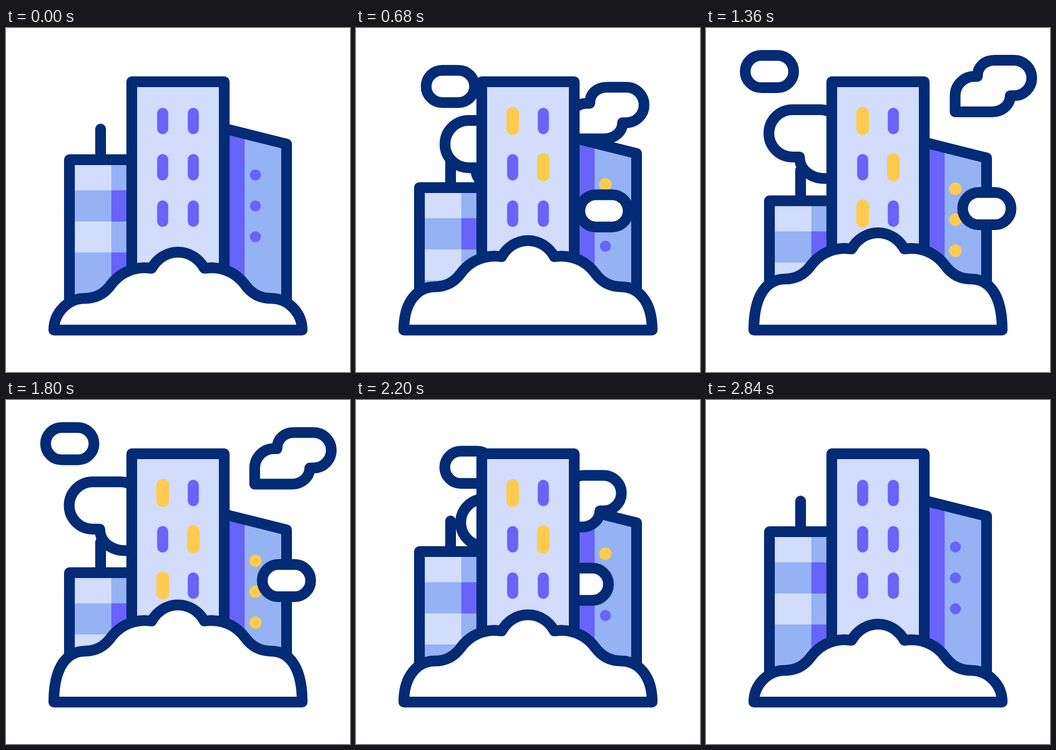
Recreate the animation shown at these times as an HTML page. Size 640 by 640 pixels, loop 3000 ms.

```html
<!DOCTYPE html>
<html lang="en">
<head>
<meta charset="utf-8">
<title>City in the clouds</title>
<style>
  html, body { margin: 0; width: 100%; height: 100%; overflow: hidden; background: #fff; }
  svg { display: block; width: 100%; height: 100%; }
  .line { stroke: #042b76; stroke-width: 20; stroke-linecap: round; stroke-linejoin: round; }
  .white { fill: #fff; }
  .light { fill: #d2dcfd; }
  .mid { fill: #94b2f4; }
  .violet { fill: #6863f9; }
  .none { fill: none; }
</style>
</head>
<body>
<svg viewBox="0 0 640 640">
  <defs>
    <clipPath id="ground"><rect width="640" height="530"/></clipPath>
  </defs>

  <g clip-path="url(#ground)">
    <g id="left">
      <rect class="light" x="118" y="245" width="116" height="300"/>
      <rect class="mid" x="196" y="245" width="38" height="300"/>
      <rect class="mid" x="118" y="302" width="78" height="58"/>
      <rect class="violet" x="196" y="302" width="38" height="58"/>
      <rect class="mid" x="118" y="417.500" width="78" height="130"/>
      <rect class="violet" x="196" y="417.500" width="38" height="130"/>
      <path class="line none" d="M118 560V245H234M176 188V245"/>
    </g>
    <g id="right">
      <path class="mid" d="M406 187L522 216V560H406Z"/>
      <path class="violet" d="M406 187L444 196.500V560H406Z"/>
      <path class="line none" d="M406 187L522 216V560"/>
      <g id="dots"></g>
    </g>
  </g>

  <g class="line white">
    <rect id="pillA" x="73" y="51" width="90" height="60" rx="30"/>
    <path id="puffA" d="M161 152H212C236 152 254 172 254 196V280H222C195 280 174 264 174 240H161A44 44 0 0 1 161 152Z"/>
    <path id="puffB" d="M463.500 156V126A36 36 0 0 1 499.500 90H505C505 72 518 60 537 60H573A33 33 0 0 1 573 126H566C566 143 551 156 532 156Z"/>
    <rect id="pillB" x="477.500" y="306" width="90" height="60" rx="30"/>
  </g>

  <rect class="line light" x="234" y="100" width="172" height="410"/>
  <g id="windows" stroke-linecap="round"></g>
  <path id="mound" class="line white"/>
</svg>

<script>
const LOOP = 3000, STEP = 40, BACK = 1600;
const VIOLET = '#6863f9', YELLOW = '#ffcb4f';
const $ = id => document.getElementById(id);

function add(parent, tag, attrs) {
  const el = document.createElementNS('http://www.w3.org/2000/svg', tag);
  for (const k in attrs) el.setAttribute(k, attrs[k]);
  return $(parent).appendChild(el);
}

// Ease knots: time in ms, value, slope per ms
const KNOTS = [
  [120, 0, 0], [400, .097, .00095], [480, .25, .0021],
  [600, .515, .0022], [880, .928, .0005], [1240, 1, 0]
];

function ease(t) {
  if (t <= KNOTS[0][0]) return 0;
  for (let i = 1; i < KNOTS.length; i++) {
    const [t0, v0, m0] = KNOTS[i - 1], [t1, v1, m1] = KNOTS[i];
    if (t > t1) continue;
    const h = t1 - t0, s = (t - t0) / h, r = 1 - s;
    return r * r * ((1 + 2 * s) * v0 + s * h * m0) +
           s * s * ((3 - 2 * s) * v1 - r * h * m1);
  }
  return 1;
}

// Out along the ease, back again after the pause
const phase = (t, delay = 0) => t < BACK ? ease(t - delay) : 1 - ease(t - BACK);

// Lights: [on, off] in ms
const lights = [];

[[440, 2520], [600, 2200], [760, 1960]].forEach((span, i) => {
  const el = add('dots', 'circle', { cx: 464, cy: 273.5 + 57.5 * i });
  lights.push({ span, set(lit) {
    el.setAttribute('fill', lit ? YELLOW : VIOLET);
    el.setAttribute('r', lit ? 11.6 : 10.2);
  } });
});

const spans = { 0: [520, 2480], 3: [680, 2320], 4: [800, 2120] };
for (let i = 0; i < 6; i++) {
  const x = 291.5 + 57 * (i % 2), y = 173 + 86.2 * Math.floor(i / 2);
  const el = add('windows', 'path', {
    d: `M${x} ${y - 14.3}V${y + 14.3}`, stroke: VIOLET, 'stroke-width': 20.6
  });
  if (spans[i]) lights.push({ span: spans[i], set(lit) {
    el.setAttribute('stroke', lit ? YELLOW : VIOLET);
    el.setAttribute('stroke-width', lit ? 23.6 : 20.6);
  } });
}

function moundPath(rise) {
  const y = v => (v - rise).toFixed(2);
  return `M89 562C89 ${y(530)} 115 ${y(503)} 147 ${y(503)}` +
    `C168 ${y(503)} 184 ${y(493)} 195 ${y(478)}` +
    `C209 ${y(459)} 231 ${y(446)} 258 ${y(446)}L271 ${y(447)}` +
    `C281 ${y(429)} 299 ${y(417)} 320 ${y(417)}` +
    `C341 ${y(417)} 359 ${y(429)} 369 ${y(447)}L382 ${y(446)}` +
    `C409 ${y(446)} 431 ${y(459)} 445 ${y(478)}` +
    `C456 ${y(493)} 472 ${y(503)} 493 ${y(503)}` +
    `C525 ${y(503)} 551 ${y(530)} 551 562Z`;
}

const move = (id, x, y) => $(id).setAttribute('transform', `translate(${x} ${y})`);

function draw(t) {
  const p = phase(t), q = 1 - p;
  move('left', 0, 76.5 * p);
  move('right', 0, 25.7 * p);
  move('pillA', 179 * q, 86 * q);
  move('puffA', 151 * q, 62 * q);
  move('puffB', -218 * q, 156 * q);
  move('pillB', -190 * q, 13 * q);
  $('mound').setAttribute('d', moundPath(36 * phase(t, 40)));
  for (const { span, set } of lights) set(t >= span[0] && t < span[1]);
}

const start = performance.now();
function tick() {
  const t = (performance.now() - start) % LOOP;
  draw(Math.floor(t / STEP) * STEP);
  requestAnimationFrame(tick);
}
tick();
</script>
</body>
</html>
```
